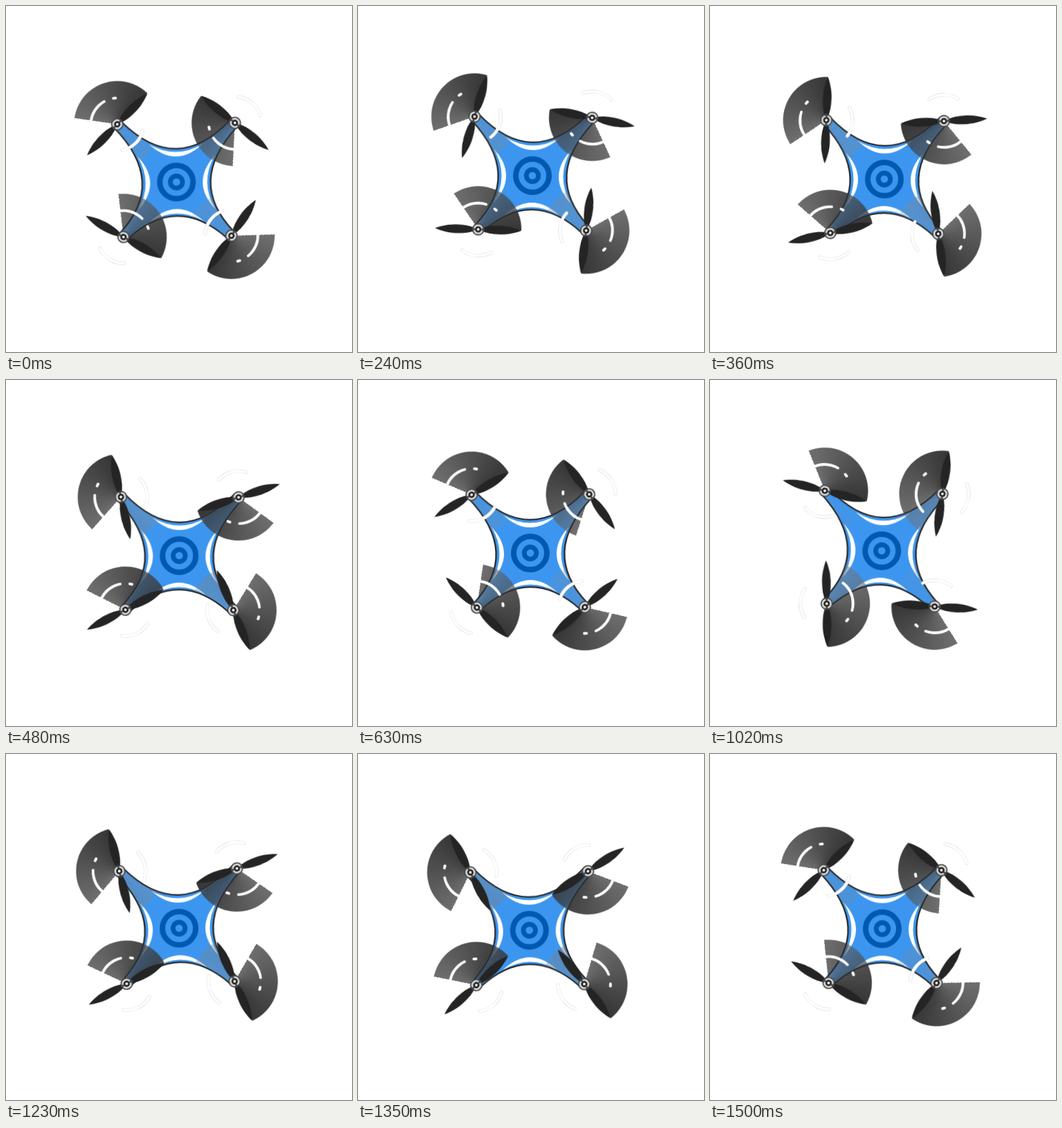
An HTML page without scripts for the animation above (1.53 s loop, 500 px wide and 500 px high).

```html
<!DOCTYPE html>
<html lang="en">
<head>
<meta charset="utf-8">
<title>Drone</title>
<style>
  html, body { margin: 0; width: 100%; height: 100%; overflow: hidden; background: #fff; }
  .drone, .layer { position: absolute; left: 0; top: 0; width: 500px; height: 500px; }
  .drone { transform-origin: 250px 250px; animation: hover 1530ms ease-in-out infinite; }
  .trails { clip-path: url(#hull-clip); }

  .spin {
    position: absolute;
    left: calc(250px + var(--x)); top: calc(250px + var(--y));
    width: 125px; height: 125px; margin: -62.5px;
    border-radius: 50%;
    /* 51 frames of 86.4deg */
    animation: spin 1530ms steps(51) -2ms infinite;
  }
  .spin svg { display: block; overflow: visible; }
  .tl { --x: -85px; --y: -85px; --a: -45deg; }
  .tr { --x: 85px; --y: -85px; --a: -140.5deg; }
  .br { --x: 78px; --y: 78px; --a: 125deg; }
  .bl { --x: -78px; --y: 78px; --a: 30deg; }

  /* The blur is solid off the hull and a full fading turn over it. */
  .blur { background: conic-gradient(from 90deg, #0000 234deg, #6e6e6e 234deg, #363636); }
  .trail {
    background: conic-gradient(from 90deg, #8880, rgb(136 136 136 / .33) 140deg,
      rgb(110 110 110 / .55) 234deg, rgb(54 54 54 / .84));
  }

  @keyframes spin {
    from { rotate: var(--a); }
    to { rotate: calc(var(--a) + 4406.4deg); }
  }
  @keyframes hover {
    0% { transform: translate(-3.7px, 4.4px) rotate(-.7deg); }
    15.69% { transform: translate(2px, -4.8px) rotate(.6deg); animation-timing-function: ease-out; }
    18.3% { transform: translate(3px, -6px) rotate(.6deg); }
    28.5% { transform: translate(1px, 5.5px) rotate(.3deg); }
    31.37% { transform: translate(.3px, 3.8px) rotate(.2deg); }
    52.94% { transform: translate(-2.8px, -5px) rotate(-.8deg); }
    66.67% { transform: translate(-1.8px, -3.2px) rotate(1.5deg); }
    80.39% { transform: translate(.1px, 1.8px) rotate(-1.3deg); }
    90.2% { transform: translate(-2.5px, 5px) rotate(-.5deg); }
    98.04%, 100% { transform: translate(-1.1px, 2.4px) rotate(0deg); }
  }
</style>
</head>
<body>
<div class="drone">
  <div class="spin blur tl"></div>
  <div class="spin blur tr"></div>
  <div class="spin blur br"></div>
  <div class="spin blur bl"></div>
  <svg class="layer" viewBox="-250 -250 500 500">
    <defs>
      <path id="hull" d="M-80-88Q0-6 80-88L88-80Q12 0 81 73L73 81Q0 15-73 81L-81 73Q-12 0-88-80Z"/>
      <path id="shine" d="M-39-56Q0-33 39-56Q0-20-39-56Z"/>
      <clipPath id="hull-clip"><use href="#hull" transform="translate(250 250)"/></clipPath>
      <path id="blade" d="M4-2C20-8 44-8 62.5 0C44 8 20 8 4 2Z"/>
      <g id="rotor">
        <g fill="#242424">
          <use href="#blade"/>
          <use href="#blade" transform="scale(-1 1)"/>
        </g>
        <g fill="none" stroke="#fff" stroke-width="3.8" stroke-linecap="round">
          <circle r="38" pathLength="360" stroke="#d6d6d6" stroke-width="4.8" stroke-dasharray="66 294" stroke-dashoffset="-59"/>
          <circle r="38" pathLength="360" stroke-dasharray="66 294" stroke-dashoffset="-59"/>
          <circle r="38" pathLength="360" stroke-dasharray="67 293" stroke-dashoffset="-219"/>
          <circle r="38" pathLength="360" stroke-dasharray="5 355" stroke-dashoffset="-307"/>
        </g>
        <circle r="9" fill="#484848"/>
        <circle r="5.8" pathLength="360" fill="none" stroke="#d8d8d8" stroke-width="2.4" stroke-dasharray="150 30" stroke-dashoffset="-15"/>
        <circle r="4" fill="#1c1c1c"/>
        <circle r="2" fill="#f4f4f4"/>
      </g>
    </defs>
    <use href="#hull" fill="#3c96f0" stroke="#2b2b2b" stroke-width="4.5" stroke-linejoin="round"/>
    <use href="#hull" fill="#3c96f0"/>
    <g fill="#fff" transform="translate(0 1)">
      <use href="#shine"/>
      <use href="#shine" transform="rotate(90)"/>
      <use href="#shine" transform="rotate(180)"/>
      <use href="#shine" transform="rotate(270)"/>
    </g>
    <g fill="none" stroke="#0059b0">
      <circle r="24" stroke-width="8"/>
      <circle r="8.75" stroke-width="6.8"/>
    </g>
  </svg>
  <div class="layer trails">
    <div class="spin trail tl"></div>
    <div class="spin trail tr"></div>
    <div class="spin trail br"></div>
    <div class="spin trail bl"></div>
  </div>
  <div class="spin tl"><svg viewBox="-62.5 -62.5 125 125"><use href="#rotor"/></svg></div>
  <div class="spin tr"><svg viewBox="-62.5 -62.5 125 125"><use href="#rotor"/></svg></div>
  <div class="spin br"><svg viewBox="-62.5 -62.5 125 125"><use href="#rotor"/></svg></div>
  <div class="spin bl"><svg viewBox="-62.5 -62.5 125 125"><use href="#rotor"/></svg></div>
</div>
</body>
</html>
```
